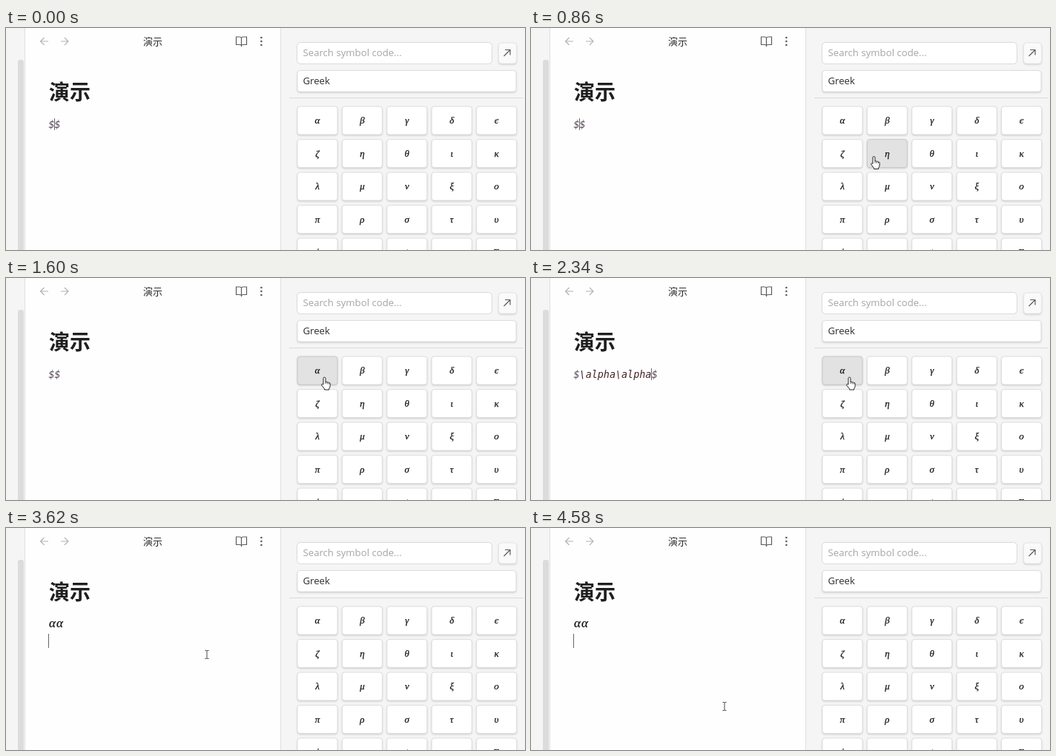
Write an HTML page with a canvas that moves like this. It is 700 by 300 pixels and loops after 4600 ms.

```html
<!DOCTYPE html>
<html lang="zh-CN">
<head>
<meta charset="utf-8">
<style>
html, body { margin: 0; width: 100%; height: 100%; overflow: hidden; background: #f5f5f5; }
canvas { display: block; width: 700px; height: 300px; }
</style>
</head>
<body>
<canvas id="stage" width="700" height="300"></canvas>
<script>
const ctx = document.getElementById('stage').getContext('2d');
const LOOP = 4600;
const CJK = '"Noto Sans CJK SC", "Noto Sans CJK", sans-serif';
const UI = '"Open Sans", "Noto Sans", sans-serif';
const MONO = '"DejaVu Sans Mono", monospace';
const MATH = '"Liberation Serif", serif';
const LETTERS = [...'αβγδєζηθικλμνξοπρστυϕχψωΓ'];
const CHAR_W = 8.1;

const HAND = new Path2D('M-1.5 9.5V1.1a1.5 1.5 0 0 1 3 0V6q1.3-.7 2.3.4q1.4-.5 2.2.6q1.5-.2 1.7 1.3V11q0 2.3-1.5 4V16.5H0V15.2L-3.6 10.6q-.8-1.5.5-1.8q.8 0 1.6.7Z');
const HAND_LINES = new Path2D('M1.5 6V8.6M3.8 6.4V8.9M6 7V9');
const ARROW = new Path2D('M0 0V15L3.6 11.7L6 17L8.2 16L5.9 10.9H10.6Z');
const I_BEAM = new Path2D('M-2.5 -5.5H-.7L0 -5L.7 -5.5H2.5M0 -5V5M-2.5 5.5H-.7L0 5L.7 5.5H2.5');

// Pointer waypoints: time, x, y
const PATH = [
  [420, 566, 318], [640, 520, 240], [860, 462.5, 174], [960, 461, 172],
  [1260, 429.5, 134.5], [2380, 429.5, 134.5], [2680, 283, 150],
  [2920, 279, 150], [3300, 278, 153], [3620, 271, 171], [4580, 261, 241]
];

// Editor states: start time, source text, caret index
const STATES = [
  [0, '$$', 1],
  [1760, '$\\alpha$', 7],
  [2060, '$\\alpha\\alpha$', 13],
  [2760, '$\\alpha\\alpha$', 14],
  [3300, null, 0]
];

function text(str, x, y, font, color, align = 'left') {
  ctx.font = font;
  ctx.fillStyle = color;
  ctx.textAlign = align;
  ctx.fillText(str, x, y);
}

function mathText(str, x, y, size, style = 'italic') {
  text(str, x, y, `${style} ${size}px ${MATH}`, '#161616', 'center');
  ctx.strokeStyle = '#161616';
  ctx.lineWidth = 0.25;
  ctx.strokeText(str, x, y);
}

function rect(x, y, w, h, color) {
  ctx.fillStyle = color;
  ctx.fillRect(x, y, w, h);
}

function stroke(path, color, width = 1) {
  ctx.strokeStyle = color;
  ctx.lineWidth = width;
  ctx.stroke(typeof path === 'string' ? new Path2D(path) : path);
}

function box(x, y, w, h, { fill = '#fff', border = '#dedede', raised = true, r = 3.5 } = {}) {
  ctx.beginPath();
  ctx.roundRect(x, y, w, h, r);
  ctx.save();
  if (raised) {
    ctx.shadowColor = 'rgba(0,0,0,.2)';
    ctx.shadowBlur = 3;
    ctx.shadowOffsetY = 1.2;
  }
  ctx.fillStyle = fill;
  ctx.fill();
  ctx.restore();
  ctx.strokeStyle = border;
  ctx.lineWidth = 1;
  ctx.stroke();
}

function pointerAt(t) {
  const i = PATH.findIndex(p => p[0] > t);
  if (i === 0) return null;
  if (i < 0) return PATH[PATH.length - 1].slice(1);
  const [t0, x0, y0] = PATH[i - 1], [t1, x1, y1] = PATH[i];
  const u = (t - t0) / (t1 - t0), k = u * u * (3 - 2 * u);
  return [x0 + (x1 - x0) * k, y0 + (y1 - y0) * k];
}

function drawFrame() {
  rect(0, 0, 700, 300, '#f5f5f5');
  ctx.beginPath();
  ctx.roundRect(16, 43, 8, 270, 3);
  ctx.fillStyle = '#dcdcdc';
  ctx.fill();
  rect(25, 0, 346, 300, '#e0e0e0');
  rect(26, 0, 344, 300, '#fefefe');

  stroke('M57 18H47M51.5 13L46.5 18L51.5 23M74 18H84M79 13L84 18L79 23', '#b4b4b4', 1.2);
  stroke('M317.5 13.5Q317 12 315 12H310.5V22.5H315.5Q317 22.5 317.5 24Q318 22.5 319.5 22.5H324.5V12H320Q318 12 317.5 13.5V24', '#5c5c5c', 1.2);
  for (const y of [13, 18, 23]) rect(343.3, y - 1.1, 2.2, 2.2, '#555');
  text('演示', 198, 22.5, `13px ${CJK}`, '#2b2b2b', 'center');
  text('演示', 58, 97, `bold 28px ${CJK}`, '#1f1f1f');
}

function drawEditor(t) {
  const [start, source, caret] = STATES.findLast(s => s[0] <= t);
  if (source) {
    const font = `italic 13.4px ${MONO}`;
    const end = 57.5 + (source.length - 1) * CHAR_W;
    text('$', 57.5, 134.5, font, '#544855');
    text(source.slice(1, -1), 57.5 + CHAR_W, 134.5, font, '#452426');
    text('$', end, 134.5, font, '#544855');
  } else {
    for (const x of [62.5, 72.5]) mathText('α', x, 134, 17);
  }
  const phase = start === 0 ? t + 350 : t - start;
  if (Math.floor(phase / 500) % 2 === 0) {
    const x = Math.floor(57.1 + caret * CHAR_W);
    rect(x, source ? 122 : 143, 1, source ? 16 : 19, '#666');
  }
}

// Returns whether the pointer rests on a key.
function drawPanel(pointer) {
  box(392.5, 19.5, 263, 29, { border: '#d9d9d9', raised: false, r: 5 });
  text('Search symbol code...', 400.5, 38, `13.2px ${UI}`, '#a5a5a5');
  box(664.5, 20, 24, 28, { fill: '#fafafa', border: '#e6e6e6', r: 4 });
  stroke('M671.5 38L680 29.5M673 29.5H680V36.5', '#5c5c5c', 1.2);
  box(393, 57.5, 295, 28.5);
  text('Greek', 400.5, 76, `13.2px ${UI}`, '#2c2c2c');
  rect(382, 94, 316, 1, '#dadada');

  let over = false;
  LETTERS.forEach((letter, i) => {
    const x = 393 + (i % 5) * 60.4, y = 106 + Math.floor(i / 5) * 44.5;
    const hover = pointer && pointer[0] >= x && pointer[0] <= x + 54
      && pointer[1] >= y && pointer[1] <= y + 38;
    over = over || hover;
    box(x, y, 54, 38, hover ? { fill: '#e2e2e2', border: '#c8c8c8' } : {});
    mathText(letter, x + 27, y + 23, 13, letter === 'Γ' ? 'normal' : 'italic');
  });
  return over;
}

function drawPointer([x, y], overKey) {
  ctx.save();
  ctx.translate(x, y);
  if (x < 370) {
    stroke(I_BEAM, '#4a4a4a');
  } else {
    const shape = overKey ? HAND : ARROW;
    ctx.fillStyle = '#fff';
    ctx.fill(shape);
    stroke(shape, '#222');
    if (overKey) stroke(HAND_LINES, '#333', 0.8);
  }
  ctx.restore();
}

const origin = performance.now();

function render() {
  const t = (performance.now() - origin) % LOOP;
  const pointer = pointerAt(t);
  drawFrame();
  drawEditor(t);
  const overKey = drawPanel(pointer);
  if (pointer) drawPointer(pointer, overKey);
  requestAnimationFrame(render);
}

render();
</script>
</body>
</html>
```
